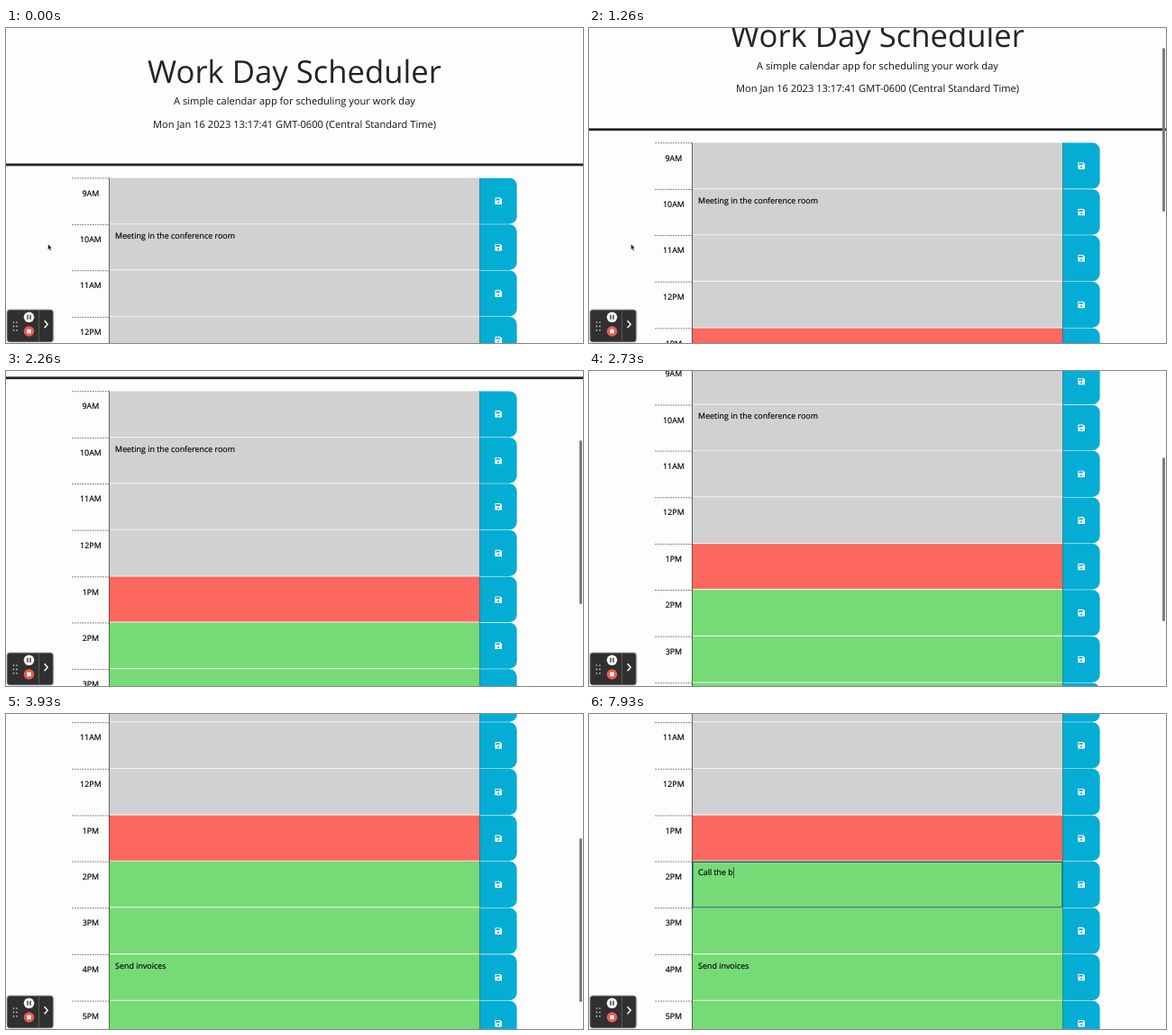
These frames come from a looping animation (640x350 px, 8 s). An HTML page:

```html
<!DOCTYPE html>
<html lang="en">
<head>
<meta charset="utf-8">
<title>Work Day Scheduler</title>
<style>
  * { box-sizing: border-box; }
  html, body { margin: 0; width: 100%; height: 100%; overflow: hidden; background: #fdfdfd; }
  #stage { position: relative; width: 640px; height: 350px; overflow: hidden; }
  #page {
    position: absolute; width: 1152px; transform-origin: 0 0;
    font: 16px/24px "Open Sans", sans-serif; color: #000; text-rendering: geometricPrecision;
  }
  header { height: 276px; padding-top: 48px; text-align: center; border-bottom: 5px solid #212529; }
  h1 { margin: 0 0 8px; font-size: 62.4px; line-height: 75px; font-weight: 400; color: #212529; }
  header p { margin: 0 0 16px; font-size: 20px; line-height: 30px; color: #111; }
  main { width: 888px; margin: 24px auto 0; -webkit-text-stroke: .3px; }
  .row { display: flex; height: 92.7px; }
  .hour { width: 74px; padding-top: 17px; text-align: center; border-top: 1px dashed #000; }
  .note {
    width: 740px; padding: 10px 11px; border: solid #000; border-width: 0 1px;
    box-shadow: inset 0 -2px #f3f3f3;
  }
  .past { background: #d1d1d1; }
  .present { background: #fd6860; }
  .future { background: #76db76; }
  .note.focus { outline: 2px solid #0d4368; outline-offset: -2px; }
  .save {
    width: 74px; margin-bottom: 1px; background: #05add4; border-radius: 0 15px 15px 0;
    display: flex; align-items: center; justify-content: center;
  }
  #caret { display: inline-block; height: 22px; border-left: 1px solid #000; vertical-align: -5px; margin-right: -1px; }
  #thumb { position: absolute; left: 636px; width: 3px; height: 182px; border-radius: 2px; background: #7c7c7c; }
  #overlay { position: absolute; left: 0; top: 0; }
  #recorder { filter: drop-shadow(0 0 1px #0008); }
</style>
</head>
<body>
<div id="stage">
  <div id="page">
    <header>
      <h1>Work Day Scheduler</h1>
      <p>A simple calendar app for scheduling your work day</p>
      <p>Mon Jan 16 2023 13:17:41 GMT-0600 (Central Standard Time)</p>
    </header>
    <main></main>
  </div>
  <div id="thumb"></div>
  <svg id="overlay" width="640" height="350">
    <g id="recorder">
      <rect x="1.5" y="313.5" width="50.5" height="35" rx="2.5" fill="#303030" stroke="#555" stroke-width=".6"/>
      <path d="M36.5 313.5V348.5" stroke="#666" stroke-width=".8"/>
      <path d="M8.5 327v9M12 327v9" stroke="#ccc" stroke-width="1.7" stroke-linecap="round" stroke-dasharray="0 4.4"/>
      <circle cx="25.5" cy="321.3" r="5.8" fill="#f4f4f4"/>
      <path d="M24 318.8v5M27 318.8v5" stroke="#333" stroke-width="1.3"/>
      <circle cx="25.5" cy="337" r="5.8" fill="#ee5a52"/>
      <rect x="23.3" y="334.8" width="4.4" height="4.4" rx=".6" fill="#fff"/>
      <path d="M42.6 325.2l3.6 4-3.6 4" fill="none" stroke="#fff" stroke-width="1.5"/>
    </g>
    <path id="arrow" d="M0 0v6.6l1.5-1.4 1.1 2.3 1.2-.6-1.1-2.2h2z" fill="#111" stroke="#fff" stroke-width=".5"/>
    <path id="beam" d="M-1.3-2.8Q0-2.8 0-1.6Q0-2.8 1.3-2.8M0-2V2M-1.3 2.8Q0 2.8 0 1.6Q0 2.8 1.3 2.8" fill="none" stroke="#444" stroke-width=".7"/>
  </svg>
</div>
<script>
const $ = id => document.getElementById(id);
const SCALE = 5 / 9, LOOP = 8000, STEP = 1000 / 15;
const hours = ['9AM', '10AM', '11AM', '12PM', '1PM', '2PM', '3PM', '4PM', '5PM'];
const notes = {
  '10AM': 'Meeting in the conference room',
  '2PM': '<span id="typed"></span><span id="caret"></span>',
  '4PM': 'Send invoices'
};
const icon = `<svg width="14" height="14" viewBox="0 0 14 14"><path fill="#fff" fill-rule="evenodd"
  d="M1.5 0H10.5L14 3.5V12.5Q14 14 12.5 14H1.5Q0 14 0 12.5V1.5Q0 0 1.5 0ZM2 2V5.5H10V2ZM7 7.8a2 2 0 1 0 .01 0Z"/></svg>`;

document.querySelector('main').innerHTML = hours.map((hour, i) => {
  const state = i < 4 ? 'past' : i === 4 ? 'present' : 'future';
  return `<div class="row"><div class="hour">${hour}</div>
    <div class="note ${state}">${notes[hour] || ''}</div><div class="save">${icon}</div></div>`;
}).join('');

// Each swipe: start, duration, distance, ease-out power
const swipes = [[940, 790, 80, 1.26], [1840, 1430, 110.7, 2.45], [3340, 600, 69.4, 2]];
const text = 'Call the b';
const keyTimes = [6200, 6460, 6600, 6730, 6800, 7000, 7130, 7260, 7400, 7930];

const clamp = v => Math.max(0, Math.min(1, v));
const show = (el, on) => { el.style.visibility = on ? 'visible' : 'hidden'; };
const place = (el, x, y) => el.setAttribute('transform', `translate(${x} ${y})`);
const noteBox = $('typed').parentNode;

function draw(t) {
  const scroll = swipes.reduce((sum, [start, duration, distance, power]) =>
    sum + distance * (1 - (1 - clamp((t - start) / duration)) ** power), 0);
  $('page').style.transform = `translateY(${-scroll}px) scale(${SCALE})`;
  $('thumb').style.top = 1 + scroll * 0.527 + 'px';
  $('thumb').style.opacity = t < 995 ? 0 : 1 - clamp((t - 4200) / 330);

  const move = clamp((t - 4660) / 400), eased = move * move * (3 - 2 * move);
  const x = 46.5 + 95 * eased, y = 240 - 59 * eased;
  const overNote = x > 114;
  place($('arrow'), x, y);
  place($('beam'), x, y);
  show($('arrow'), t < 1800 || (t > 4720 && !overNote));
  show($('beam'), t > 4720 && t < 6195 && overNote);

  const focused = t >= 5795;
  noteBox.classList.toggle('focus', focused);
  show($('caret'), focused);
  $('typed').textContent = text.slice(0, keyTimes.filter(k => t >= k - 5).length).replace(/ /g, '\u00a0');
}

function tick() {
  const t = performance.now() % LOOP;
  draw(Math.floor((t + 7) / STEP) * STEP % LOOP);
  requestAnimationFrame(tick);
}
tick();
</script>
</body>
</html>
```
